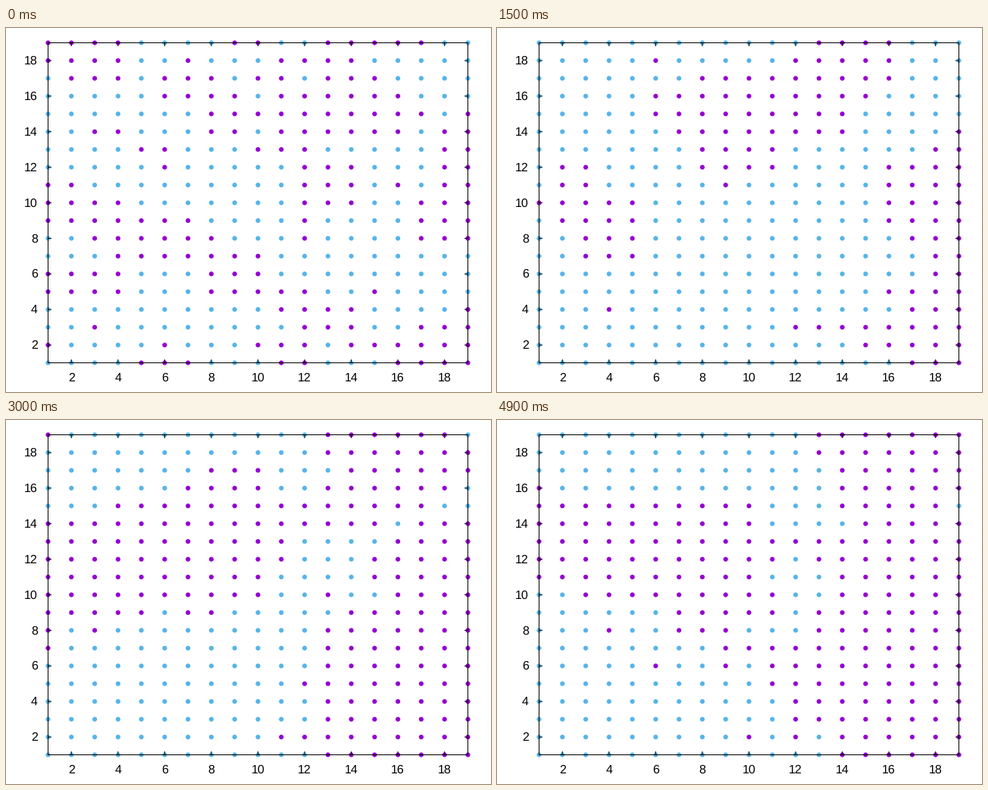
A matplotlib script for the animation above (5 s loop, 640 by 480 pixels).

```python
import numpy as np
import matplotlib.pyplot as plt
from matplotlib.animation import FuncAnimation
from matplotlib.colors import to_rgba

WIDTH, HEIGHT, DPI = 640, 480, 100
PX = 72 / DPI
SIZE, FRAMES, INTERVAL = 19, 50, 100
LEFT, RIGHT, TOP, BOTTOM = 55.5, 609.5, 19.5, 441.5
DOT_RADIUS, TICK = 3.1, 4.5
UP, DOWN = to_rgba("#9400d3"), to_rgba("#56b4e9")

COUPLING, PULL = 0.45, 0.9
AXIS = np.arange(1, SIZE + 1)
COLS, ROWS = np.meshgrid(AXIS, AXIS)

# Spin-up domains drifting in a straight line: (x, y, radius) start and end
DOMAINS = [
    ((10, 16, 3.5), (7, 11.5, 4)),
    ((3, 8, 2.5), (3, 12.5, 3.5)),
    ((12, 3, 1.5), (15, 5, 4.5)),
    ((19, 10, 3), (17, 11, 4)),
    ((18, 4, 2.2), (18, 3, 3)),
    ((14, 18, 2), (17, 17, 4)),
]


def domain_field(u):
    """Clipped signed distance to the domain edges at loop fraction u."""
    depth = []
    for start, end in DOMAINS:
        x, y, radius = (1 - u) * np.array(start) + u * np.array(end)
        depth.append(radius - np.hypot(COLS - x, ROWS - y))
    return np.clip(np.max(depth, axis=0), -1.5, 1.5)


def sweep(spins, field, rng):
    """One heat-bath sweep of the lattice, updated as a checkerboard."""
    for parity in (0, 1):
        p = np.pad(spins, 1)
        neighbours = p[:-2, 1:-1] + p[2:, 1:-1] + p[1:-1, :-2] + p[1:-1, 2:]
        energy = COUPLING * (neighbours + PULL * field)
        chance_up = 1 / (1 + np.exp(-2 * energy))
        drawn = np.where(rng.random(spins.shape) < chance_up, 1, -1)
        spins = np.where((COLS + ROWS) % 2 == parity, drawn, spins)
    return spins


def spin_history():
    rng = np.random.default_rng(7)
    spins = rng.choice([-1, 1], (SIZE, SIZE))
    history = []
    for frame in range(FRAMES):
        spins = sweep(spins, domain_field(frame / (FRAMES - 1)), rng)
        history.append(spins)
    return history


def to_px(col, row):
    fx, fy = (col - 1) / (SIZE - 1), (row - 1) / (SIZE - 1)
    return LEFT + fx * (RIGHT - LEFT), BOTTOM - fy * (BOTTOM - TOP)


plt.rcParams["text.hinting"] = "none"
fig = plt.figure(figsize=(WIDTH / DPI, HEIGHT / DPI), dpi=DPI, facecolor="white")
ax = fig.add_axes([0, 0, 1, 1])
ax.set(xlim=(0, WIDTH), ylim=(HEIGHT, 0))
ax.axis("off")

dots = ax.scatter(*to_px(COLS.ravel(), ROWS.ravel()),
                  s=(2 * DOT_RADIUS * PX) ** 2, linewidths=0, zorder=2)


def black_line(xs, ys):
    ax.plot(xs, ys, color="black", lw=PX, zorder=3, snap=False,
            solid_capstyle="butt", solid_joinstyle="miter")


black_line([LEFT, RIGHT, RIGHT, LEFT, LEFT, RIGHT],
           [TOP, TOP, BOTTOM, BOTTOM, TOP, TOP])
label = dict(family="Liberation Sans", fontsize=16 * PX, color="black",
             va="baseline", zorder=4)
for value in range(2, SIZE, 2):
    x, y = to_px(value, value)
    black_line([x, x], [BOTTOM, BOTTOM - TICK])
    black_line([x, x], [TOP, TOP + TICK])
    black_line([LEFT, LEFT + TICK], [y, y])
    black_line([RIGHT, RIGHT - TICK], [y, y])
    ax.text(x, 465.5, str(value), ha="center", **label)
    ax.text(42, y + 5, str(value), ha="right", **label)

HISTORY = spin_history()


def update(frame):
    up = HISTORY[frame].ravel() > 0
    dots.set_facecolor(np.where(up[:, None], UP, DOWN))
    return (dots,)


anim = FuncAnimation(fig, update, frames=FRAMES, interval=INTERVAL,
                     repeat=True, repeat_delay=0, blit=False)
plt.show()
```
